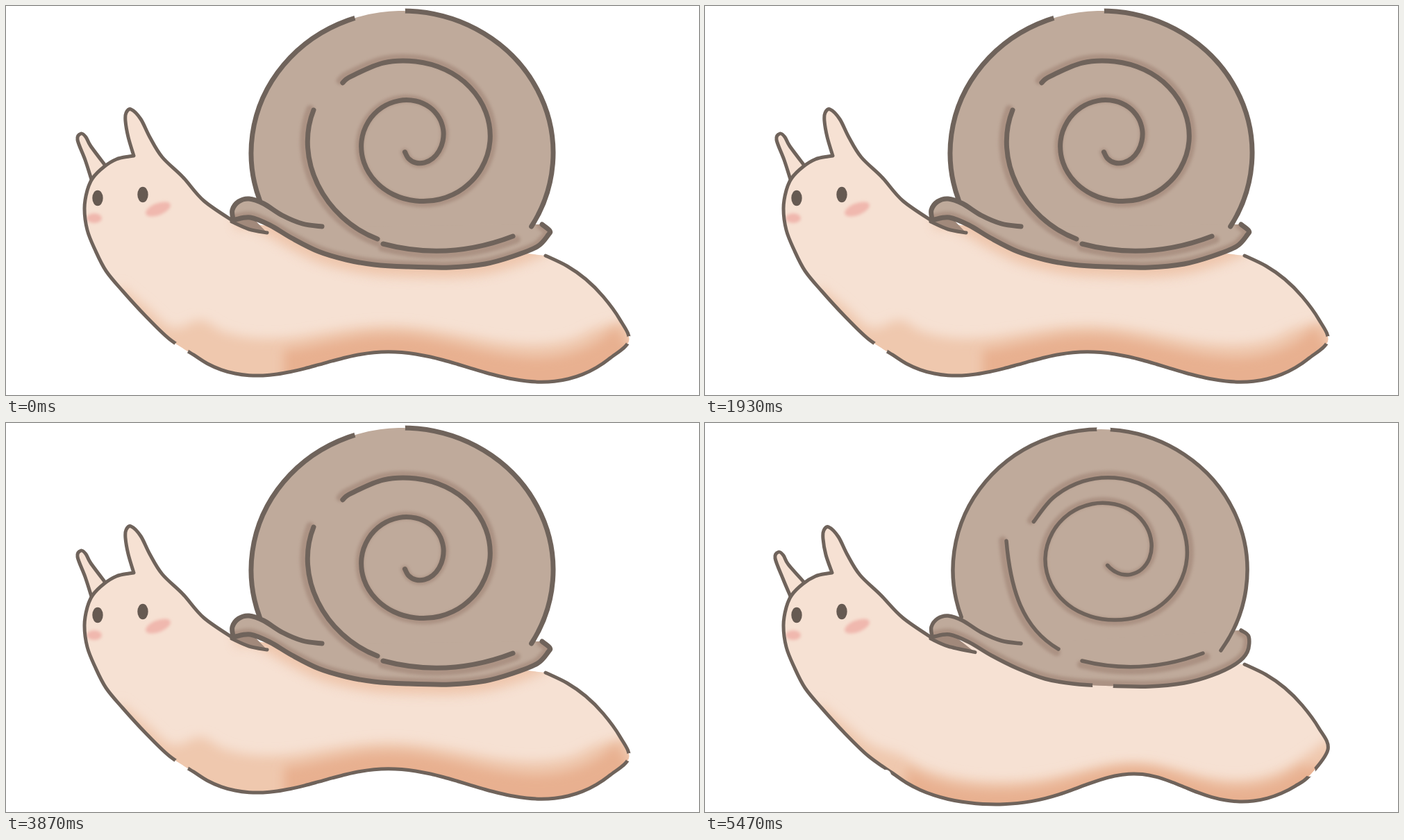
An HTML page for the animation above (5730 ms loop, 998 px wide and 561 px high).

```html
<!DOCTYPE html>
<html lang="en">
<head>
<meta charset="utf-8">
<title>Snail</title>
<style>
html, body { margin: 0; width: 100%; height: 100%; overflow: hidden; background: #fff; }
svg { display: block; width: 100%; height: 100%; }
.ink { fill: none; stroke: #6f635b; stroke-linecap: round; stroke-linejoin: round; }
.skin { fill: #f6e1d3; }
.shell { fill: #bfaa9b; }
.shade { fill: none; stroke: #a58a7b; stroke-linecap: round; }
</style>
</head>
<body>
<svg viewBox="0 0 998 561">
  <defs>
    <filter id="soft" filterUnits="userSpaceOnUse" x="0" y="0" width="998" height="640"><feGaussianBlur stdDeviation="8"/></filter>
    <filter id="fine" filterUnits="userSpaceOnUse" x="0" y="0" width="998" height="561"><feGaussianBlur stdDeviation="2.2"/></filter>
    <clipPath id="bodyClip"><path data-d="body"/></clipPath>
    <clipPath id="rimClip"><path data-d="rim"/></clipPath>
    <mask id="breaks" maskUnits="userSpaceOnUse" x="0" y="0" width="998" height="561">
      <rect width="998" height="561" fill="#fff"/>
      <g id="gaps"><circle/><circle/><circle/><circle/></g>
    </mask>
  </defs>
  <path class="skin" data-d="horn"/>
  <path class="ink" data-d="horn" stroke-width="5"/>
  <path class="skin" data-d="body"/>
  <g clip-path="url(#bodyClip)">
    <path data-d="mid" fill="#efc8ae" filter="url(#soft)"/>
    <path data-d="deep" fill="#e8b090" filter="url(#soft)"/>
    <path id="glow" data-d="hull" fill="none" stroke="#ecbfa3" stroke-width="30" filter="url(#soft)"/>
    <g id="cheeks" fill="#f0b8ae" filter="url(#fine)"><ellipse rx="11" ry="7"/><ellipse rx="19" ry="8.5"/></g>
    <g id="eyes" fill="#665a52"><ellipse rx="7.7" ry="11.3"/><ellipse rx="7.7" ry="11.3"/></g>
  </g>
  <g mask="url(#breaks)"><path class="ink" data-d="body" stroke-width="5"/></g>
  <path data-d="underFill" fill="#a1897b"/>
  <path class="ink" data-d="under" stroke-width="5"/>
  <path class="shell" data-d="domeFill"/>
  <path class="shell" data-d="rim"/>
  <g clip-path="url(#rimClip)">
    <path class="shade" data-d="hull" stroke-width="17" opacity=".75" filter="url(#fine)"/>
  </g>
  <g transform="translate(585 195) scale(1.035) translate(-585 -195)" opacity=".75">
    <path class="shade" data-d="lines" stroke-width="11" filter="url(#fine)"/>
  </g>
  <g id="shellInk" mask="url(#breaks)">
    <path class="ink" data-d="dome"/>
    <path class="ink" data-d="rim"/>
    <path class="ink" data-d="lines"/>
  </g>
</svg>
<script>
// horn, stalk: tips; notches: x, lift, left and right reach of each raised part of the belly
// dome: left, right, top; coil: radius at each quarter turn; side: start, end, bend; gaps: x, y, radius
const rise = {
  horn: [108, 184], stalk: [180, 149], eyes: [132, 197], head: 0, tail: 12,
  notches: [[555, 57, 155, 165]], band: 58, deep: [400, 900],
  dome: [353, 788, 7], coil: [31, 39, 58, 78, 86, 107, 115, 148], coilEnd: 6.57,
  side: [443, 150, 535, 336, 28], hem: 730, knob: 315, sag: -3, under: 376, width: 7, glow: 0.8,
  gaps: [[252, 494, 11], [898, 482, 6], [538, 8, 37], [577, 376, 0]]
};
const reach = {
  horn: [105, 185], stalk: [181, 151], eyes: [124, 191], head: -2, tail: 7,
  notches: [[485, 62, 100, 140]], band: 52, deep: [310, 900],
  dome: [356, 786, 5], coil: [27, 42, 64, 80, 76, 105, 118, 136], coilEnd: 6.73,
  side: [440, 153, 533, 338, 15], hem: 700, knob: 304, sag: -4, under: 398, width: 6, glow: 0,
  gaps: [[284, 513, 11], [883, 495, 9], [553, 5, 19], [575, 374, 10]]
};
const turn = {
  horn: [121, 185], stalk: [169, 152], eyes: [118, 181], head: 1, tail: 0,
  notches: [[425, 56, 75, 118], [825, 46, 78, 52]], band: 32, deep: [440, 780],
  dome: [356, 786, 2], coil: [23, 41, 70, 88, 80, 95, 112, 130], coilEnd: 6.77,
  side: [440, 155, 508, 334, 10], hem: 691, knob: 303, sag: 0, under: 412, width: 5.5, glow: 0,
  gaps: [[279, 510, 12], [279, 279, 5], [558, 2, 15], [578, 378, 13]]
};
const ripple = {
  horn: [113, 193], stalk: [191, 159], eyes: [136, 193], head: 3, tail: 0,
  notches: [[330, 39, 40, 100], [745, 44, 140, 85]], band: 48, deep: [390, 690],
  dome: [360, 783, 4], coil: [25, 48, 68, 89, 89, 94, 117, 116], coilEnd: 6.74,
  side: [436, 166, 502, 327, -1], hem: 686, knob: 298, sag: 0, under: 384, width: 5.5, glow: 0,
  gaps: [[274, 274, 5], [650, 532, 6], [571, 4, 16], [571, 378, 16]]
};
const settle = {
  horn: [106, 186], stalk: [178, 150], eyes: [132, 197], head: 0, tail: 0,
  notches: [[620, 51, 112, 105]], band: 34, deep: [290, 900],
  dome: [357, 781, 9], coil: [19, 50, 78, 100, 89, 104, 116, 131], coilEnd: 6.73,
  side: [434, 170, 509, 326, -6], hem: 717, knob: 299, sag: 0, under: 389, width: 5.5, glow: 0,
  gaps: [[260, 508, 8], [871, 502, 8], [574, 9, 10], [573, 378, 15]]
};

function between(a, b) {
  if (typeof a === 'number') return (a + b) / 2;
  if (Array.isArray(a)) return a.map((v, i) => between(v, b[i]));
  return Object.fromEntries(Object.keys(a).map(k => [k, between(a[k], b[k])]));
}

const range = (from, to, step) => Array.from({ length: Math.floor((to - from) / step) + 1 }, (_, i) => from + i * step);
const shift = (points, [dx, dy]) => points.map(([x, y]) => [x + dx, y + dy]);
const clampAt = (list, i) => list[Math.max(0, Math.min(list.length - 1, i))];

// Smooth curve through all points
function curve(points, start = 'M') {
  let d = start + points[0];
  for (let i = 0; i < points.length - 1; i++) {
    const [p, a, b, q] = [-1, 0, 1, 2].map(k => clampAt(points, i + k));
    d += 'C' + [a.map((n, k) => n + (b[k] - p[k]) / 6), b.map((n, k) => n - (q[k] - a[k]) / 6), b];
  }
  return d;
}

// How far the belly is lifted off its full outline at x
const lift = (pose, x) => pose.notches.reduce((sum, [mid, height, left, right]) =>
  sum + height * Math.exp(-(((x - mid) / (x < mid ? left : right)) ** 2)), 0);

function belly(pose, x) {
  const s = (x - 566) / 331;
  return 476 + 80 * (1 - Math.abs(s) ** 5) + 6 * s - lift(pose, x);
}

function body(pose) {
  const root = 184 + (pose.stalk[0] - 180) / 2;
  const neck = [[330, 312], [285, 281], ...shift([[75, 98], [45, 69], [27, 40], [14, 14], [0, 0], [-7, 5], [-8, 17], [-4, 40]], pose.stalk), [root, 216]];
  const face = shift([[159, 221], [141, 232], [125, 248], [117, 266], [113, 292], [117, 323], [128, 351], [144, 382], [168, 411], [200, 446], [235, 480]], [pose.head, 0]);
  const base = range(270, 870, 20).map(x => [x, belly(pose, x)]);
  const tail = shift([[897, 471], [884, 440], [860, 407], [835, 382], [808, 363], [777, 348]], [0, pose.tail]);
  return curve(neck) + curve([[root - 7, 217], ...face, ...base, ...tail], 'L');
}

function horn({ horn: tip, head }) {
  const sides = shift([[6, 38], [-5, 9], [0, 0], [7, 5], [14, 18]], tip);
  return curve([[123 + head, 250], ...sides, [143 + head, 230]]);
}

const bandTop = (pose, x, share) => [x, belly(pose, x) - share * Math.max(6, pose.band - 0.35 * lift(pose, x))];

function mid(pose) {
  const edge = range(280, 870, 30).map(x => bandTop(pose, x, 1));
  return curve([[163, 402], [200, 432], [240, 464], ...edge, [905, 450]]) + 'V620H163Z';
}

function deep(pose) {
  const [from, to] = pose.deep;
  return curve(range(from, Math.min(to, 880), 30).map(x => bandTop(pose, x, 0.65))) + `L${to},500V620H${from}Z`;
}

function dome({ dome: [left, right, top], knob }) {
  const rx = (right - left) / 2, ry = 212 - top, cx = left + rx;
  const half = y => rx * Math.sqrt(1 - ((y - 212) / ry) ** 2);
  const foot = 328 - Math.max(0, knob - 305);
  return `M${cx - half(280)},280A${rx},${ry} 0 1 1 ${cx + half(foot)},${foot}`;
}

function hull({ sag, knob }, start = 'M') {
  const left = [[330, 308], [352, 305], [380, 316], [412, 335], [450, 354]];
  const middle = shift([[490, 369], [530, 376], [577, 379], [640, 380], [690, 375], [730, 364]], [0, sag]);
  return curve([...left, ...middle, [765, 347], [781, 330], [783, knob + 9], [772, knob]], start);
}

const lip = curve([[455, 318], [427, 314], [398, 302], [371, 285], [350, 278], [335, 282], [326, 294], [327, 308]]);

function spiral({ coil, coilEnd }) {
  const radii = [14, ...coil];
  const radius = turn => {
    const i = Math.floor(turn + 1), t = turn + 1 - i;
    const [p, a, b, q] = [-1, 0, 1, 2].map(k => clampAt(radii, i + k));
    return a + t / 2 * (b - p + t * (2 * p - 5 * a + 4 * b - q + t * (3 * (a - b) + q - p)));
  };
  return curve([...range(-0.5, coilEnd, 0.25), coilEnd].map(turn => {
    const r = radius(turn), angle = turn * Math.PI / 2;
    return [590 + r * Math.sin(angle), 195 + r * Math.cos(angle)];
  }));
}

function lines(pose) {
  const [x, y, endX, endY, bend] = pose.side;
  const side = `M${x},${y}C${x - bend},${y + 70} 457,${endY - 30} ${endX},${endY}`;
  const hem = `M543,343Q${(543 + pose.hem) / 2},${358 + (pose.hem - 690) / 4} ${pose.hem},332`;
  return side + hem + spiral(pose);
}

const under = ({ under: x }) => curve([[325, 311], [350, 322], [x, 327 + (x - 376) * 0.28]]);

const shapes = {
  body, horn, mid, deep, dome, hull, lines, under,
  rim: pose => lip + hull(pose, 'L'),
  domeFill: pose => dome(pose) + 'L700,340L460,345L385,308Z',
  underFill: pose => under(pose) + 'L350,300Z'
};

const find = query => [...document.querySelectorAll(query)];
const paths = find('[data-d]'), eyes = find('#eyes ellipse'), cheeks = find('#cheeks ellipse'), gaps = find('#gaps circle');
const shellInk = find('#shellInk')[0], glow = find('#glow')[0];
const set = (el, attrs) => Object.entries(attrs).forEach(([name, value]) => el.setAttribute(name, value));

function draw(pose) {
  paths.forEach(el => set(el, { d: shapes[el.dataset.d](pose) }));
  const [left, right] = pose.eyes;
  set(eyes[0], { cx: left, cy: 277 });
  set(eyes[1], { cx: right, cy: 272 });
  set(cheeks[0], { cx: left - 5, cy: 306 });
  set(cheeks[1], { transform: `translate(${right + 22} 293) rotate(-22)` });
  gaps.forEach((el, i) => { const [cx, cy, r] = pose.gaps[i]; set(el, { cx, cy, r }); });
  set(shellInk, { 'stroke-width': pose.width });
  set(glow, { opacity: pose.glow });
}

const poses = [rise, between(rise, reach), reach, turn, ripple, settle];
const cuts = [0, 330, 670, 970, 1300, 1600, 1930, 2270, 2570, 2900, 3200, 3530, 3870, 4170, 4500, 4800, 5130, 5470];
const loop = 5730;
const begin = performance.now();
let shown = -1;

function tick() {
  const t = (performance.now() - begin) % loop;
  const index = (cuts.filter(cut => cut <= t).length - 1) % poses.length;
  if (index !== shown) draw(poses[shown = index]);
  requestAnimationFrame(tick);
}
tick();
</script>
</body>
</html>
```
